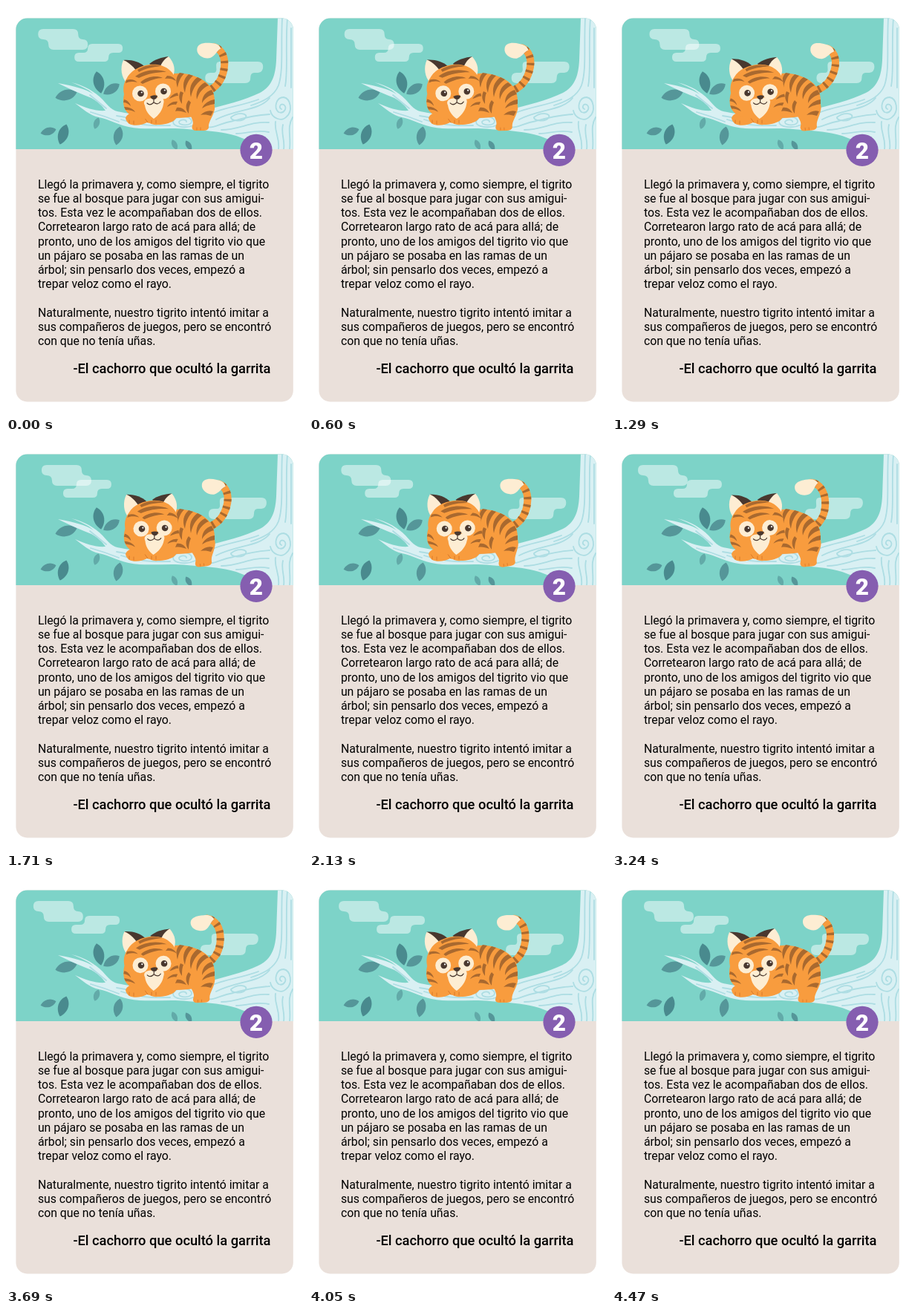
Animation, 400 px wide and 550 px high, one loop 4500 ms. Source, as an HTML page:

```html
<!DOCTYPE html>
<html lang="es">
<head>
<meta charset="utf-8">
<style>
html, body { margin: 0; width: 100%; height: 100%; overflow: hidden; background: #fff; }
svg { display: block; width: 400px; height: 550px; font-family: Roboto, sans-serif; }
.line { fill: none; stroke-linecap: round; stroke-linejoin: round; }
.cloud { fill: #fff; opacity: .48; }
.orange { fill: #f89c3e; }
.cream { fill: #fdedd3; }
.stripe { fill: #a9692f; }
.dark { fill: #49382f; }
</style>
</head>
<body>
<svg viewBox="0 0 400 550">
  <defs>
    <clipPath id="card"><rect x="13.4" y="16.5" width="373.4" height="517" rx="15"/></clipPath>
    <clipPath id="sky"><rect x="13" y="16" width="374" height="177"/></clipPath>
    <path id="leaf" d="M0-15C10-7 9 7 0 15C-9 7-10-7 0-15Z"/>
    <path id="tailShape" d="M271 115C283 110 291 99 293 84C295 70 290 58 279 55"/>
  </defs>
  <g clip-path="url(#card)">
    <rect x="13" y="16" width="374" height="518" fill="#eae0da"/>
    <g clip-path="url(#sky)">
      <rect x="13" y="16" width="374" height="177" fill="#7dd3c8"/>
      <g id="clouds">
        <path class="cloud" d="M7 31H47Q54 31 54 38T60 45Q67 45 67 52T60 59H21Q14 59 14 52T7 45Q0 45 0 38T7 31Z"/>
        <path class="cloud" d="M246 75H296Q303 75 303 82T296 90H291Q286 90 286 97T279 104H232Q225 104 225 97T232 90H237Q241 90 240 82T246 75Z"/>
      </g>
      <path id="lowCloud" class="cloud" d="M24 51H59Q65 51 65 57T59 63H52Q46 63 46 69T40 75H6Q0 75 0 69T6 63H12Q18 63 18 57T24 51Z"/>
      <g id="leaves"></g>

      <!-- trunk and branch -->
      <path fill="#d9f0f3" d="M366 16H387V193H348C338 186 324 180 310 175C290 169 267 168 244 166C218 163 190 168 165 163C148 159 140 153 125 150C112 147 104 139 93 131C109 138 121 142 134 141C130 135 124 129 115 124C102 119 88 113 70 104C92 108 108 112 118 119C111 112 99 107 88 103C106 107 120 116 130 126C138 135 143 142 155 143C185 149 235 147 266 141C292 134 322 127 342 117C359 108 363 92 364 73Z"/>
      <g class="line" stroke="#addde3" stroke-width="1.8">
        <path d="M372 16C370 55 374 86 367 107C361 122 346 129 330 134"/>
        <path d="M379 16C376 55 380 86 376 108M384 30V110"/>
        <path d="M371 139C367 137 369 131 374 133C380 137 374 146 367 143C360 137 364 123 374 123C384 125 386 142 378 149C371 157 358 151 356 141"/>
        <path d="M386 150C378 164 384 174 382 193M363 156C361 169 369 178 367 193M373 160C370 172 376 181 374 193"/>
        <path d="M340 126C313 136 286 138 270 148M355 124C342 141 310 139 283 153"/>
        <path d="M355 146C337 147 320 151 306 155C286 158 284 165 268 163M354 157C330 155 314 167 290 167M354 170C336 166 325 172 310 172"/>
        <path d="M303 150C312 142 326 145 323 150C319 157 302 155 303 150Z"/>
        <path d="M255 160C242 166 225 163 225 156C226 147 249 147 250 155C251 162 232 162 233 156C236 152 243 153 243 156"/>
        <path d="M221 161C190 162 174 159 155 153M208 155C188 157 168 151 149 148M114 143C128 147 137 150 152 156M113 120L135 138"/>
      </g>

      <!-- tail -->
      <g id="tail">
        <use href="#tailShape" class="line" stroke="#f89c3e" stroke-width="10"/>
        <use href="#tailShape" class="line" style="stroke-linecap:butt" stroke="#a9692f" stroke-width="10" stroke-dasharray="3.2 6.8" stroke-dashoffset="-7"/>
        <path class="cream" d="M288 57C282 61 281 67 274 70C266 72 256 67 256 59C256 51 265 49 275 50C281 50 286 52 288 57Z"/>
      </g>

      <!-- body and hanging leg -->
      <path class="orange" d="M212 95C226 88 249 90 264 99C280 108 286 128 276 141C265 151 228 151 202 152Z"/>
      <g id="leg">
        <path class="orange" d="M246 128C261 113 283 122 281 139C279 150 272 156 273 164Q272 168 266 168H255Q249 167 251 161C255 153 243 146 246 128Z"/>
        <path class="line" stroke="#df7d2b" stroke-width="1" d="M257 164V167M262 164V167"/>
      </g>
      <g class="stripe">
        <path d="M234 90C229 95 228 102 231 110C232 103 235 96 240 91Z"/>
        <path d="M246 92C239 98 237 107 241 117C242 108 245 100 252 94Z"/>
        <path d="M258 96C249 102 246 112 249 123C251 113 255 105 264 99Z"/>
        <path d="M268 103C259 107 255 116 257 126C260 117 264 111 273 107Z"/>
        <path d="M277 113C268 116 264 122 264 131C268 124 273 121 280 119Z"/>
        <path d="M281 126C274 127 267 131 264 138C270 134 276 133 281 132Z"/>
        <path d="M279 142C273 140 267 142 262 147C268 146 272 147 276 148Z"/>
        <path d="M235 115C232 121 233 127 237 132C237 126 237 121 239 117Z"/>
        <path d="M246 127C241 133 242 140 246 145C246 139 247 134 249 130Z"/>
        <path d="M230 137C236 136 240 139 243 144C237 142 233 141 228 142Z"/>
      </g>
      <path class="orange" d="M161 151C164 142 179 141 187 149C200 143 222 137 229 145C234 152 222 160 204 160C198 161 195 158 190 157C181 162 163 164 161 151Z"/>
      <path class="line" stroke="#d97929" d="M166 154V158M172 155V159M196 154V158M202 154V158M186 150L191 157"/>

      <!-- head -->
      <g id="head">
        <path class="dark" d="M158 73C169 72 179 75 186 81L174 94Z"/>
        <path class="cream" d="M158 73C153 84 156 97 162 103L178 91C173 83 166 76 158 73Z"/>
        <path class="dark" d="M193 78C200 72 210 69 219 68L212 91Z"/>
        <path class="cream" d="M219 68C227 77 229 87 224 97L206 87C208 79 212 72 219 68Z"/>
        <path class="orange" d="M163 97C171 80 205 71 221 87C230 94 230 109 230 119C234 129 225 139 216 144C204 153 179 155 168 147C157 141 157 128 159 119C157 109 159 103 163 97Z"/>
        <path class="cream" d="M187 134C183 127 191 123 199 125C207 121 215 124 212 132C211 140 206 147 199 152C192 147 188 141 187 134Z"/>
        <g class="stripe">
          <path d="M177 86C187 79 201 78 209 81C198 82 188 84 179 89Z"/>
          <path d="M174 95C185 86 204 84 216 89C204 89 191 91 179 97Z"/>
          <path d="M181 103C189 95 203 93 211 97C203 97 194 100 184 105Z"/>
          <path d="M162 100C168 98 173 99 177 103C170 101 165 102 161 104Z"/>
          <path d="M217 94C223 94 227 97 229 101C224 98 220 97 214 98Z"/>
          <path d="M159 126C164 127 167 131 168 135C165 132 162 130 158 130Z"/>
          <path d="M159 136C166 136 172 139 174 143C168 140 164 140 161 140Z"/>
          <path d="M231 117C226 118 222 121 220 125C225 123 228 121 232 121Z"/>
          <path d="M231 129C225 128 219 132 217 136C222 133 226 132 229 133Z"/>
        </g>
        <g id="eyes"></g>
        <path class="dark" d="M194 122Q199 119 204 121Q203 126 199 126Q196 126 194 122Z"/>
        <path class="line" stroke="#49382f" stroke-width="1.2" d="M199 126V130Q194 135 190 131M199 130Q205 134 208 129"/>
      </g>
    </g>
  </g>

  <circle cx="337" cy="194.3" r="21.6" fill="#855eb0"/>
  <text x="337" y="205.6" text-anchor="middle" font-size="31.5" font-weight="900" fill="#fff">2</text>
  <g id="story" font-size="15.8"></g>
  <text x="356.5" y="494.8" text-anchor="end" font-size="18.3" font-weight="500">-El cachorro que ocultó la garrita</text>
</svg>
<script>
const $ = id => document.getElementById(id);
const LOOP = 4500;

const story = `Llegó la primavera y, como siempre, el tigrito
se fue al bosque para jugar con sus amigui-
tos. Esta vez le acompañaban dos de ellos.
Corretearon largo rato de acá para allá; de
pronto, uno de los amigos del tigrito vio que
un pájaro se posaba en las ramas de un
árbol; sin pensarlo dos veces, empezó a
trepar veloz como el rayo.

Naturalmente, nuestro tigrito intentó imitar a
sus compañeros de juegos, pero se encontró
con que no tenía uñas.`;
$('story').innerHTML = story.split('\n')
  .map((line, i) => `<text x="42.9" y="${245.8 + i * 19.2}">${line}</text>`).join('');

// x, y, angle, scale, colour
const leaves = [
  [81, 120, 76, 1, '#559699'], [125, 103, -12, 1, '#498a8e'], [142, 112, 58, .85, '#559699'],
  [151, 175, 12, .85, '#559699'], [122, 158, 18, .55, '#62aaa8'], [57, 169, 75, .72, '#559699'],
  [77, 173, 18, .95, '#498a8e'], [246, 188, -30, .5, '#559699'], [227, 187, -25, .5, '#62aaa8']
];
$('leaves').innerHTML = leaves.map(([x, y, angle, scale, fill]) =>
  `<use href="#leaf" fill="${fill}" transform="translate(${x} ${y}) rotate(${angle}) scale(${scale})"/>`).join('');

$('eyes').innerHTML = [[180.5, 118], [211.5, 115]].map(([x, y]) =>
  `<circle cx="${x}" cy="${y}" r="10.5" class="cream"/>
   <circle cx="${x + 1}" cy="${y}" r="4.3" class="dark"/>
   <circle cx="${x + 2.3}" cy="${y - 1.5}" r="1.1" fill="#fff"/>`).join('');

// Evenly spaced horizontal drift, smoothed with a periodic cubic curve
const drift = [43.2, 46.9, 50.2, 49.7, 44.7, 39.4, 35.4, 35.5, 39.7];
function sampleDrift(t) {
  const n = drift.length, pos = t / LOOP * n, i = Math.floor(pos), u = pos - i;
  const [a, b, c, d] = [-1, 0, 1, 2].map(k => drift[(i + k + n) % n]);
  return b + u / 2 * (c - a + u * (2 * a - 5 * b + 4 * c - d + u * (3 * (b - c) + d - a)));
}

const move = (id, transform) => $(id).setAttribute('transform', transform);

function draw(now) {
  const t = now % LOOP, phase = t / LOOP * 2 * Math.PI;
  const x = sampleDrift(t), sway = (1 - Math.cos(phase)) / 2;
  move('clouds', `translate(${x})`);
  move('lowCloud', `translate(${83.7 + 8.5 * Math.cos(phase + .1)})`);
  move('tail', `rotate(${(x - 43) * 1.4 + 1} 272 115)`);
  move('leg', `rotate(${-9 * sway} 262 132)`);
  move('head', `rotate(${4 * sway} 197 142)`);
  requestAnimationFrame(draw);
}
requestAnimationFrame(draw);
</script>
</body>
</html>
```
